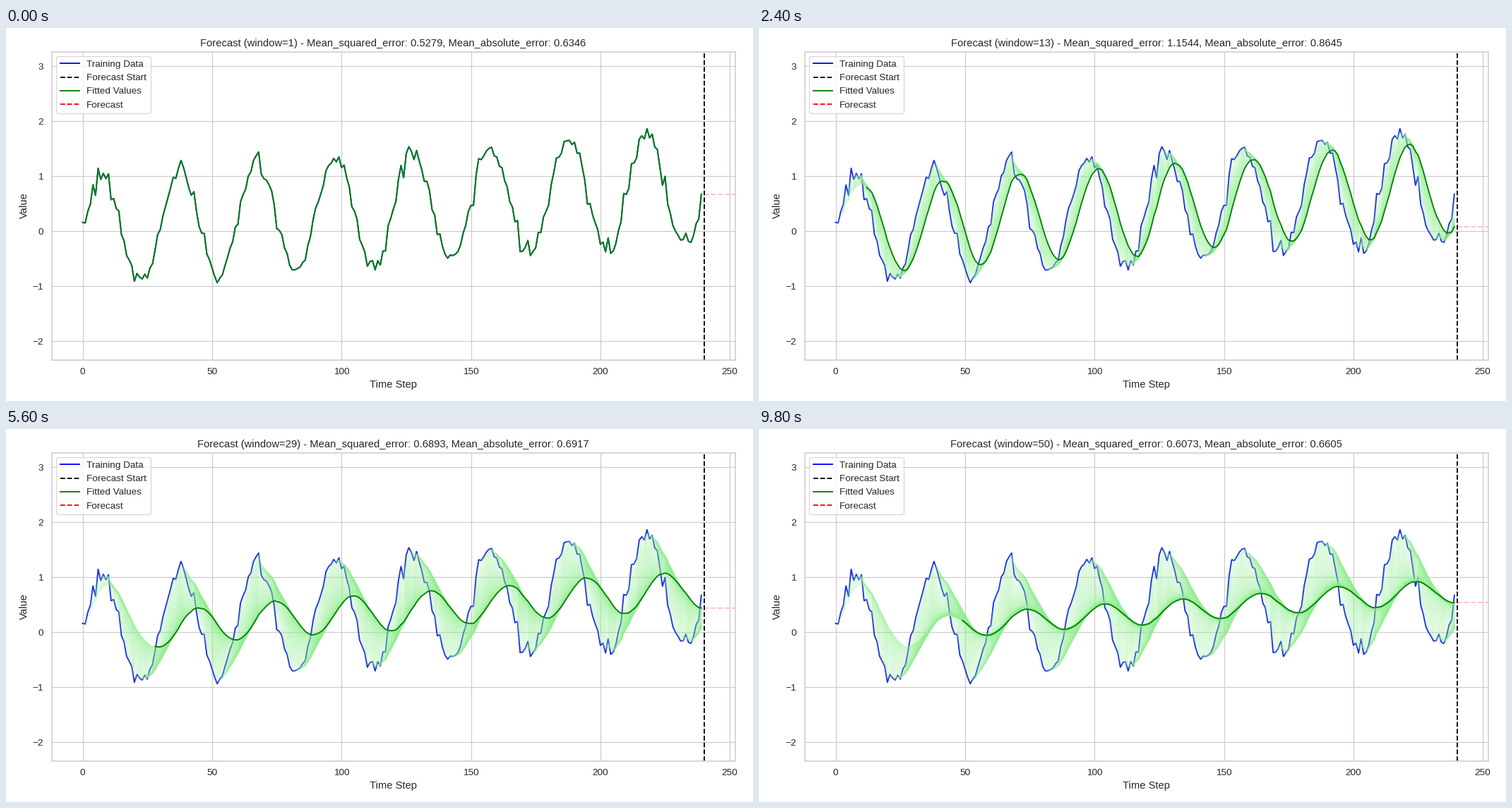
A matplotlib script that plays this animation: 1058x529 px, repeating every 10 s.

```python
import matplotlib.pyplot as plt
import numpy as np
from matplotlib.animation import FuncAnimation

FRAMES, STEP_MS = 50, 200
N, SPLIT, PERIOD = 300, 240, 30

plt.rcParams.update({
    "font.family": "Liberation Sans",
    "text.color": ".15", "axes.labelcolor": ".15",
    "xtick.color": ".15", "ytick.color": ".15",
    "axes.edgecolor": ".8", "axes.linewidth": 1.25, "axes.axisbelow": True,
    "grid.color": ".8", "grid.linewidth": 1,
    "axes.titlesize": 12, "axes.labelsize": 12,
    "xtick.labelsize": 11, "ytick.labelsize": 11, "legend.fontsize": 11,
    "xtick.major.size": 6, "ytick.major.size": 6,
    "xtick.bottom": False, "ytick.left": False,
    "lines.linewidth": 1.5,
})

# Noisy sine on a linear trend
np.random.seed(1)
t = np.arange(N)
series = np.sin(2 * np.pi * t / PERIOD) + t / (N - 1) + 0.1 * np.random.randn(N)
train, test = series[:SPLIT], series[SPLIT:]


def weighted_average(w):
    """Linearly weighted moving average, newest value heaviest."""
    weights = np.arange(w, 0, -1)
    return np.convolve(train, weights / weights.sum(), "valid")


fits = [weighted_average(w) for w in range(1, FRAMES + 1)]

fig = plt.figure(figsize=(12, 6), dpi=529 / 6)
ax = fig.add_axes([64.5 / 1058, 58.5 / 529, 968 / 1058, 437 / 529])
ax.grid(True)
ax.set_xlabel("Time Step")
ax.set_ylabel("Value")
margin = 0.5 * np.ptp(train)
ax.set_xlim(-12, 252)
ax.set_ylim(train.min() - margin, train.max() + margin)

ax.plot(t[:SPLIT], train, color="blue")
ax.axvline(SPLIT, color="black", ls="--")
trails = [ax.plot(t[w:SPLIT], fit, color="lightgreen")[0]
          for w, fit in enumerate(fits)]
fitted, = ax.plot([], [], color="green")
forecast, = ax.plot([], [], color="red", ls="--", alpha=0.25)

styles = [("Training Data", "blue", "-"), ("Forecast Start", "black", "--"),
          ("Fitted Values", "green", "-"), ("Forecast", "red", "--")]
handles = [plt.Line2D([], [], color=c, ls=ls, label=name)
           for name, c, ls in styles]
ax.legend(handles=handles, loc="upper left")


def update(i):
    fit = fits[i]
    for trail, alpha in zip(trails, np.linspace(0.2, 0.6, max(i, 1))):
        trail.set_alpha(alpha)
    for k, trail in enumerate(trails):
        trail.set_visible(k < i)
    fitted.set_data(t[i:SPLIT], fit)
    forecast.set_data(t[SPLIT:], np.full(N - SPLIT, fit[-1]))
    error = test - fit[-1]
    ax.set_title(f"Forecast (window={i + 1}) - "
                 f"Mean_squared_error: {np.mean(error ** 2):.4f}, "
                 f"Mean_absolute_error: {np.mean(abs(error)):.4f}")


anim = FuncAnimation(fig, update, frames=FRAMES, interval=STEP_MS,
                     init_func=lambda: None, repeat=True, repeat_delay=0)
plt.show()
```
